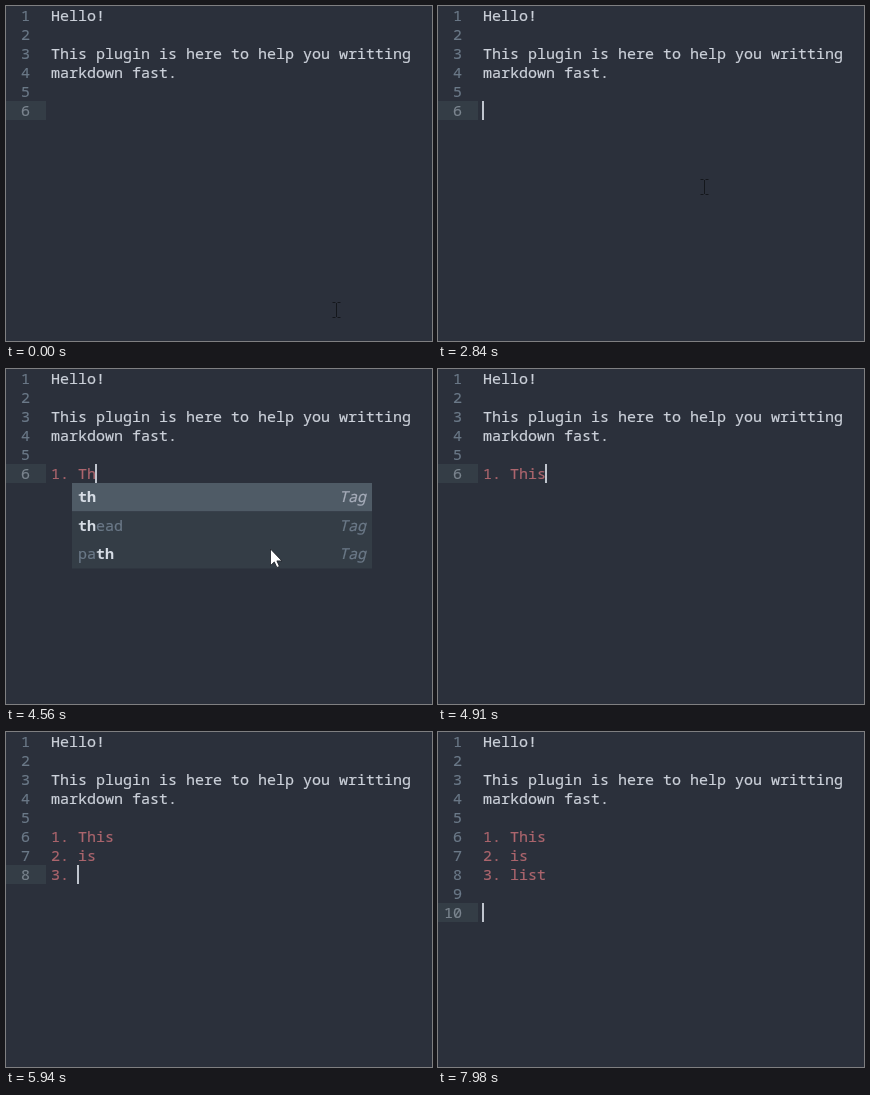
An HTML page for the animation above (8 s loop, 426 by 335 pixels).

```html
<!DOCTYPE html>
<html lang="en">
<head>
<meta charset="utf-8">
<style>
  html, body { margin: 0; width: 100%; height: 100%; overflow: hidden; background: #2b303b; }
  svg { display: block; width: 426px; height: 335px; }
  text { font: 15px "Noto Sans Mono", monospace; white-space: pre; }
  .b { font-weight: 700; fill: #d8dee6; }
  .i { font-style: italic; }
</style>
</head>
<body>
<svg id="stage" viewBox="0 0 426 335"></svg>
<script>
const stage = document.getElementById('stage');
const LOOP = 8000, ROW = 19, COL = 9, LEFT = 45, ITEM = 28.5;
const PLAIN = '#ccd1da', LIST = '#ac656d', DIM = '#6b7988', CARET = '#c0c5ce';
const INTRO = ['Hello!', '', 'This plugin is here to help you writting', 'markdown fast.', ''];

// Each step changes some of: typed lines, caret opacity, mouse, popup.
const steps = [
  { at: 0, typed: [''], caret: 0, beam: [330, 304], arrow: false, popup: null },
  { at: 330, beam: [290, 180] },
  { at: 790, beam: [276, 180] },
  { at: 1140, caret: 1 },
  { at: 1490, caret: 0, beam: [266, 181] },
  { at: 2490, caret: .5 },
  { at: 2840, caret: 1 },
  { at: 3190, caret: 0 },
  { at: 3520, typed: ['1.'], caret: 1 },
  { at: 3870, typed: ['1. '] },
  { at: 4560, typed: ['1. Th'], beam: null, arrow: true, popup: ['*th*', '*th*ead', 'pa*th*'] },
  { at: 4910, typed: ['1. This'], arrow: false, popup: null },
  { at: 5240, typed: ['1. This', '2. '] },
  { at: 5590, typed: ['1. This', '2. is'], arrow: true, popup: ['*is*index', '*i*n*s*'] },
  { at: 5940, typed: ['1. This', '2. is', '3. '], arrow: false, popup: null },
  { at: 6270, caret: 0 },
  { at: 6620, typed: ['1. This', '2. is', '3. li'], caret: 1 },
  { at: 6950, typed: ['1. This', '2. is', '3. list'] },
  { at: 7300, typed: ['1. This', '2. is', '3. list', '4. '] },
  { at: 7650, typed: ['1. This', '2. is', '3. list', '', ''], caret: 0 },
  { at: 7980, caret: 1 }
];
for (let i = 1; i < steps.length; i++) steps[i] = { ...steps[i - 1], ...steps[i] };

const rect = (x, y, w, h, fill, opacity = 1) =>
  `<rect x="${x}" y="${y}" width="${w}" height="${h}" fill="${fill}" opacity="${opacity}"/>`;
const text = (x, y, fill, content, cls = '') =>
  `<text x="${x}" y="${y}" fill="${fill}" stroke="${fill}" stroke-width=".2" class="${cls}">${content}</text>`;

function drawPopup(items, top) {
  return items.map((item, i) => {
    const y = top + i * ITEM;
    const label = item.replace(/\*(\w+)\*/g, '<tspan class="b">$1</tspan>');
    const color = i ? DIM : '#a7adba';
    return rect(66, y, 300, ITEM, i ? '#343d46' : '#4f5b66') +
      text(72, Math.round(y + 19), color, label) +
      text(333, Math.round(y + 19), color, 'Tag', 'i');
  }).join('');
}

const drawBeam = ([x, y]) =>
  `<path d="M${x - 3.5} ${y - 7.5}h3m2 0h3M${x + .5} ${y - 7}v14M${x - 3.5} ${y + 7.5}h3m2 0h3"
    fill="none" stroke="#14171c"/>`;

const drawArrow = () =>
  `<path d="M264.5 180v16.5l3.8-3.6 2.6 5.6 2.5-1.1-2.5-5.5h5z"
    fill="#fff" stroke="#1b1e25" stroke-width=".8"/>`;

function draw({ typed, caret, beam, arrow, popup }) {
  const lines = INTRO.concat(typed);
  const last = lines.length - 1, top = last * ROW;
  let out = rect(0, top, 40, ROW, '#343d46');
  lines.forEach((line, i) => {
    const y = i * ROW + 15, number = String(i + 1);
    out += text(24 - COL * number.length, y, i === last ? '#7b858f' : DIM, number);
    out += text(LEFT, y, /^\d\. /.test(line) ? LIST : PLAIN, line);
  });
  out += rect(LEFT - 1 + lines[last].length * COL, top, 2, ROW, CARET, caret);
  if (popup) out += drawPopup(popup, top + ROW);
  if (beam) out += drawBeam(beam);
  if (arrow) out += drawArrow();
  stage.innerHTML = out;
}

let shown;
function tick() {
  const t = performance.now() % LOOP;
  const step = steps.findLast(s => s.at <= t);
  if (step !== shown) draw(shown = step);
  requestAnimationFrame(tick);
}
tick();
</script>
</body>
</html>
```
